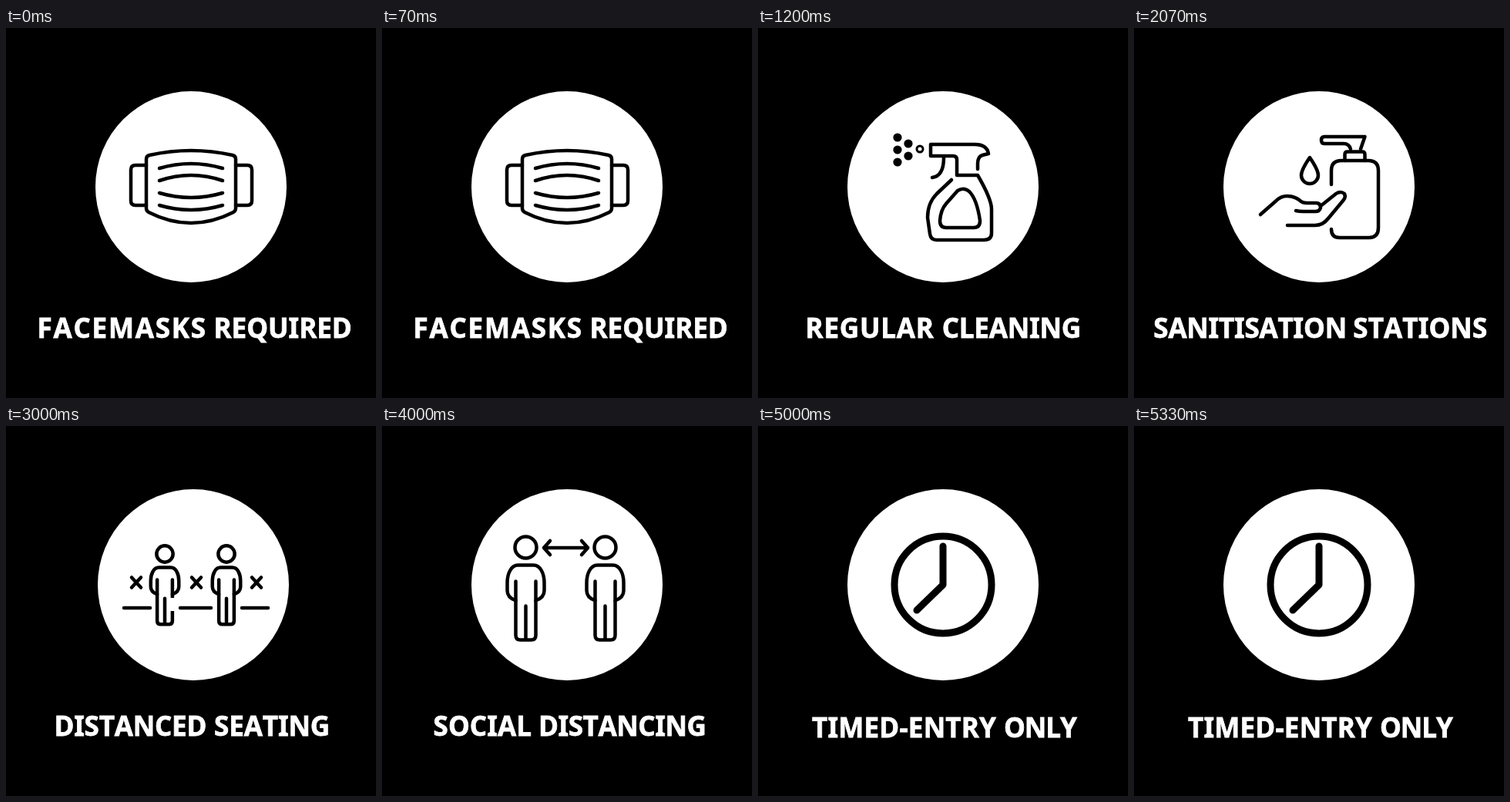
An HTML page for the animation above (5990 ms loop, 480 by 480 pixels).

```html
<!DOCTYPE html>
<html lang="en">
<head>
<meta charset="utf-8">
<title>Venue safety notices</title>
<style>
  html, body { margin: 0; width: 100%; height: 100%; overflow: hidden; background: #000; }
  svg { display: block; width: 100%; height: 100%; }
  .icon { fill: none; stroke: #000; stroke-width: 4.5; stroke-linecap: round; stroke-linejoin: round; }
  .solid { fill: #000; stroke: none; }
  text {
    font: 700 35px "Noto Sans", "Open Sans", sans-serif;
    font-kerning: none;
    fill: #fff; stroke: #fff; stroke-width: .8;
  }
</style>
</head>
<body>
<svg id="stage" viewBox="0 0 480 480"></svg>
<script>
const LOOP = 5990, SLIDE = 1000;

const path = (d, extra = '') => `<path d="${d}" ${extra}/>`;
const ring = (x, y, r, extra = '') => `<circle cx="${x}" cy="${y}" r="${r}" ${extra}/>`;
const dot = (x, y) => ring(x, y, 5.6, 'class="solid"');
const cross = x => path(`M${x - 6} 196.5l12 13m0 -13l-12 13`);

// A standing figure whose head is centred on (x, y)
const person = (x, y, s = 1) =>
  `<g transform="translate(${x} ${y}) scale(${s})" stroke-width="${4.5 / s}">` +
  ring(0, 0, 14) +
  path('M-13 69Q-24 65 -24 56V46C-24 34 -19 23 -10 23H10C19 23 24 34 24 46V56Q24 65 13 69') +
  path('M-13 44V114Q-13 120 -7 120H7Q13 120 13 114V44M0 76V120') +
  '</g>';

const mask =
  path('M186 165Q240 153 294 165Q298 166 298 170V234Q298 237 295 239Q240 267 185 239Q182 237 182 234V170Q182 166 186 165Z') +
  path('M182 178H168Q162 178 162 184V224Q162 230 168 230H182') +
  path('M298 178H313Q319 178 319 184V224Q319 230 313 230H298') +
  [[182, -12], [198, -14], [214, 12], [230, 12]]
    .map(([y, bend]) => path(`M199 ${y}q41 ${bend} 82 0`)).join('');

const spray =
  [[181, 142], [181, 158], [181, 174], [195, 150], [195, 166]].map(p => dot(...p)).join('') +
  ring(210, 157, 4, 'stroke-width="3"') +
  path('M285 183V176Q285 167 291 165L299 163Q297 151 281 151H224V166H253Q258 166 258 171V191H285Q303 222 303 235V266Q303 275 293 275H232Q224 275 223 267L220 246Q220 227 232 215L251 197') +
  path('M241 168Q241 192 226 194') +
  path('M259 211Q267 206 274 212Q284 222 288 250Q288 259 280 259H244Q236 259 236 250Q237 236 244 228Z');

const sanitiser =
  path('M294 157L299.500 141H247Q243 141 243 145.500Q243 150 247 150H272Q279 150 281 157') +
  path('M273.500 172V164Q273.500 160.500 277 160.500H296Q299.500 160.500 299.500 164V172') +
  path('M256 203V185Q256 172 269 172H304Q317 172 317 185V259Q317 272 305 272H267Q256 272 256 261') +
  path('M228 168Q217 184 217 191A11 11 0 0 0 239 191Q239 184 228 168Z') +
  path('M164 242L184 224.500Q192 216 204 218.500Q212 220.500 216 224.500Q219 227 224 227H236Q242 227 242 233Q241 238 235 238H220Q214 238 210 237') +
  path('M242 231L262 215Q268 211 273 215Q275 219 272 223L252 247Q245 256 235 256H199');

const seating =
  person(206, 166, .76) + person(286, 166, .76) +
  '<path d="M212 223h8v17h-8z" fill="#fff" stroke="none"/>' +
  [169, 247, 325].map(cross).join('') +
  path('M153 236H187M226 236H266M306 236H340');

const distancing =
  person(186.5, 157.5) + person(289.5, 157.5) +
  path('M210 158H267M218 149L210 158L218 167M259 149L267 158L259 167');

const clock = `<g stroke-width="9">${ring(240, 206, 63)}${path('M240 156V206L206 239')}</g>`;

// Each word: text, x, letter spacing
const slides = [
  { icon: mask, words: [['FACEMASKS', 40.5, 1.8], ['REQUIRED', 269.5, 0]] },
  { icon: spray, words: [['REGULAR', 61.5, .8], ['CLEANING', 238.7, -.2]] },
  { icon: sanitiser, words: [['SANITISATION', 25.3, -.2], ['STATIONS', 284.3, .1]] },
  { icon: seating, cx: 243, words: [['DISTANCED', 62.5, -.2], ['SEATING', 270, -.1]] },
  { icon: distancing, words: [['SOCIAL', 66.5, .1], ['DISTANCING', 203, -.4]] },
  { icon: clock, base: 404, words: [['TIMED-ENTRY', 70, .2], ['ONLY', 319, -1]] }
];

const markup = ({ icon, words, cx = 240, base = 402 }) =>
  '<g visibility="hidden">' + ring(cx, 206, 124, 'fill="#fff"') +
  `<g class="icon">${icon}</g>` +
  words.map(([word, x, gap]) =>
    `<text x="${x}" y="${base}" letter-spacing="${gap}">${word}</text>`).join('') +
  '</g>';

const stage = document.getElementById('stage');
stage.innerHTML = slides.map(markup).join('');
const groups = [...stage.children];

function draw(time) {
  const current = Math.floor((time % LOOP) / SLIDE);
  groups.forEach((g, i) => g.setAttribute('visibility', i === current ? 'visible' : 'hidden'));
}

const start = performance.now();
function tick() {
  draw(performance.now() - start);
  requestAnimationFrame(tick);
}
tick();
</script>
</body>
</html>
```
